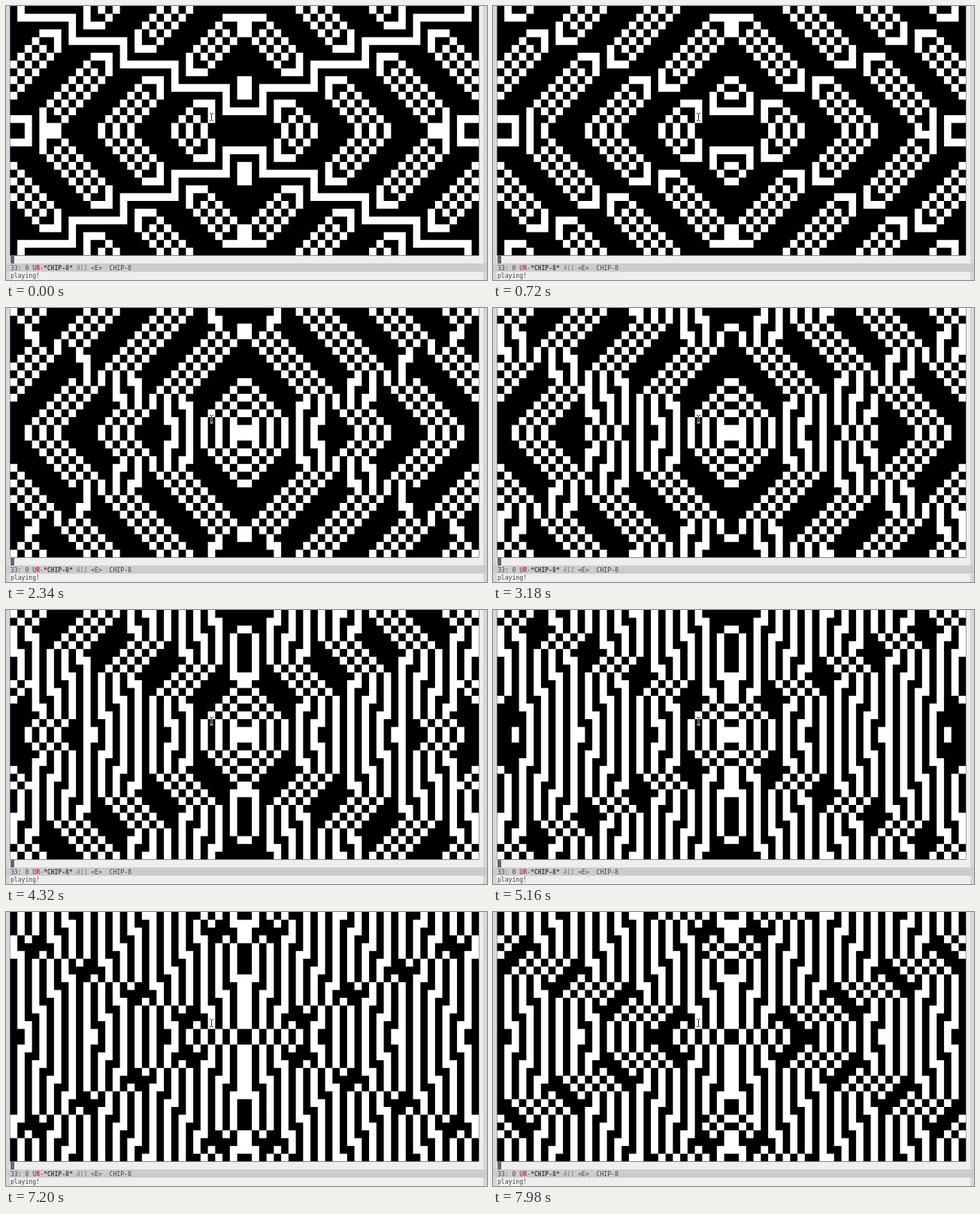
An HTML page with a canvas that plays this animation: 640 by 364 pixels, repeating every 8 s.

```html
<!DOCTYPE html>
<html lang="en">
<head>
<meta charset="utf-8">
<title>CHIP-8</title>
<style>
  html, body { margin: 0; width: 100%; height: 100%; overflow: hidden; background: #eee; }
  #stage { position: relative; width: 640px; height: 364px; overflow: hidden; background: #eee; }
  #stage > * { position: absolute; }
  canvas, svg { left: 0; top: 0; }
  .fringe { top: 0; height: 364px; background: #d6d6d6; }
  .cursor { left: 5.5px; top: 332px; width: 5px; height: 10px; background: #666; }
  .line {
    left: 0; width: 634px; height: 11px; padding-left: 6px;
    font: 8.1px/11px "DejaVu Sans Mono", monospace; white-space: pre; color: #444;
  }
  .mode { top: 342px; line-height: 13px; background: #ccc; }
  .echo { top: 353px; }
  .mode i { color: #777; }
  .mode .flag { color: #e22; font-weight: bold; }
</style>
</head>
<body>
<div id="stage">
  <div class="fringe" style="left:0;width:5px"></div>
  <div class="fringe" style="left:635px;width:5px"></div>
  <canvas id="screen" width="640" height="364"></canvas>
  <div class="cursor"></div>
  <div class="line mode">33: 0 U<span class="flag">R</span>-<b>*CHIP-8*</b> <i>All</i> &lt;E&gt;  CHIP-8</div>
  <div class="line echo">playing!</div>
  <svg width="640" height="364" fill="none">
    <defs>
      <path id="beam" d="M271 142.5H272.5L273.5 143.5L274.5 142.5H276M273.5 143.5V151.5M271 152.5H272.5L273.5 151.5L274.5 152.5H276"/>
    </defs>
    <use href="#beam" stroke="#fff" stroke-width="2"/>
    <use href="#beam" stroke="#222"/>
  </svg>
</div>
<script>
const COLS = 64, ROWS = 32, LEFT = 5.35, CELL_W = 9.75, CELL_H = 10.36;
const FRAME_MS = 60, LOOP_MS = 8000;
const FIRST_STEP = 420.95, STEPS_PER_FRAME = 3.19;
const KEYS = "LLLLLLLUUU";
// Part of a step at which each mirror image is plotted: top left, bottom left, top right, bottom right.
const PLOT_AT = [0, 0.1, 0.2, 0.28];

const ctx = document.getElementById("screen").getContext("2d");

// A point walks the top left quadrant; leaving one side nudges the other axis by one.
function move(p, key) {
  if (key === "L") p.x--; else p.y--;
  if (p.x < 0) { p.x = 31; p.y++; }
  if (p.y < 0 || p.y > 15) { p.y &= 15; p.x = (p.x + 1) & 31; }
}

// Every visit toggles a pixel and its three mirror images.
function patternAfter(steps) {
  const lit = new Uint8Array(COLS * ROWS);
  const p = { x: 31, y: 15 };
  for (let i = 0; i <= steps; i++) {
    if (i > 0) move(p, KEYS[(i - 1) % KEYS.length]);
    PLOT_AT.forEach((at, mirror) => {
      if (i + at > steps) return;
      const col = mirror & 2 ? COLS - 1 - p.x : p.x;
      const row = mirror & 1 ? ROWS - 1 - p.y : p.y;
      lit[row * COLS + col] ^= 1;
    });
  }
  return lit;
}

function draw(frame) {
  const lit = patternAfter(FIRST_STEP + STEPS_PER_FRAME * frame);
  ctx.clearRect(0, 0, 640, 364);
  ctx.globalCompositeOperation = "source-over";
  ctx.fillStyle = "#000";
  ctx.fillRect(LEFT, 0, COLS * CELL_W, ROWS * CELL_H);
  // Adding light lets the soft edges of neighbouring cells join without seams.
  ctx.globalCompositeOperation = "lighter";
  ctx.fillStyle = "#fff";
  lit.forEach((on, i) => {
    if (on) ctx.fillRect(LEFT + i % COLS * CELL_W, Math.floor(i / COLS) * CELL_H, CELL_W, CELL_H);
  });
}

const start = performance.now();
let shown = -1;
function tick() {
  const time = (performance.now() - start) % LOOP_MS;
  const frame = Math.floor(time / FRAME_MS);
  if (frame !== shown) draw(shown = frame);
  requestAnimationFrame(tick);
}
tick();
</script>
</body>
</html>
```
